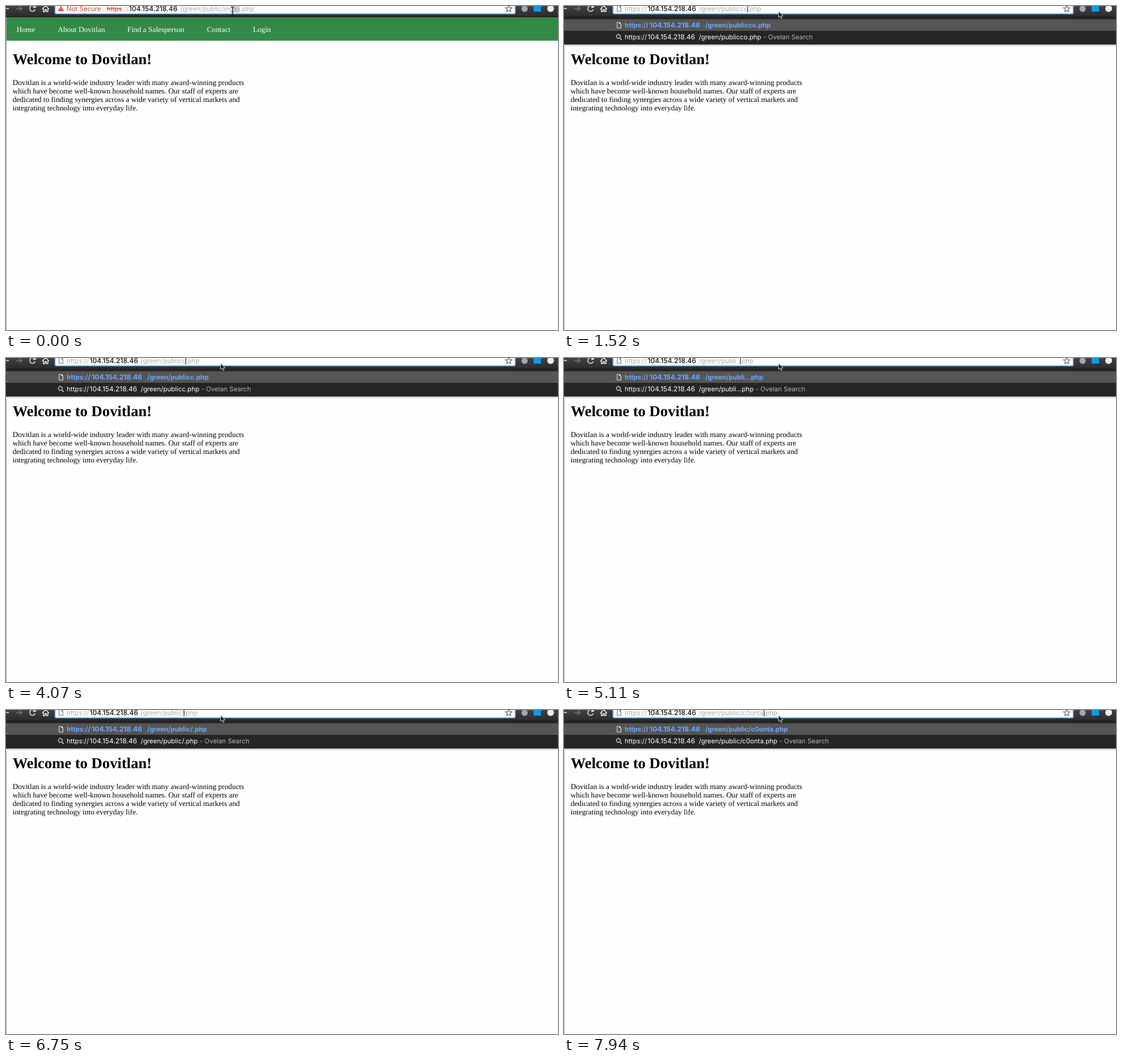
These frames come from a looping animation (975 by 574 pixels, 8 s). An HTML page:

```html
<!DOCTYPE html>
<html lang="en">
<head>
<meta charset="utf-8">
<title>Address bar</title>
<style>
  html, body { margin: 0; width: 100%; height: 100%; overflow: hidden; background: #fff; }
  svg { display: block; width: 975px; height: 574px; }
  text { text-rendering: geometricPrecision; white-space: pre; }
  .page { font: 13.33px "Liberation Serif", serif; }
  .page .title { font-size: 26.67px; font-weight: bold; }
  .ui { font: 11.5px Inter, sans-serif; }
  .host { font-size: 12.1px; }
  .bar .host { fill: #111; font-weight: 500; }
  .bar { fill: #acacac; }
  .line { fill: none; stroke-width: 1.2; }
</style>
</head>
<body>
<svg viewBox="0 0 975 574">
  <defs>
    <linearGradient id="tool" x2="0" y2="1">
      <stop offset="0" stop-color="#424242"/><stop offset="1" stop-color="#292929"/>
    </linearGradient>
    <linearGradient id="shade" x2="0" y2="1">
      <stop offset="0" stop-color="#c4c4c4"/><stop offset="1" stop-color="#f4f4f4"/>
    </linearGradient>
    <path id="doc" class="line" d="M-3 -5H1L3.5 -2.5V5H-3ZM1 -5V-2.5H3.5"/>
  </defs>

  <rect width="975" height="574" fill="#fefefe"/>
  <g class="page">
    <rect y="20" width="975" height="41.5" fill="#338a47"/>
    <g fill="#fff">
      <text x="18.8" y="46">Home</text>
      <text x="91.5" y="46">About Dovitlan</text>
      <text x="214.3" y="46">Find a Salesperson</text>
      <text x="354.9" y="46">Contact</text>
      <text x="436.2" y="46">Login</text>
    </g>
    <text class="title" x="11.7" y="103.3">Welcome to Dovitlan!</text>
    <text y="140">
      <tspan x="11.7">Dovitlan is a world-wide industry leader with many award-winning products</tspan>
      <tspan x="11.7" dy="15">which have become well-known household names. Our staff of experts are</tspan>
      <tspan x="11.7" dy="15">dedicated to finding synergies across a wide variety of vertical markets and</tspan>
      <tspan x="11.7" dy="15">integrating technology into everyday life.</tspan>
    </text>
  </g>
  <path d="M.5 20V574" stroke="#adadad"/>

  <!-- browser toolbar -->
  <rect width="975" height="20" fill="url(#tool)"/>
  <path d="M0 19.5H975" stroke="#1d1d1d"/>
  <path d="M86 -6H899.5V12Q899.5 14 897.5 14H88.5Q86.5 14 86.5 12V-6" fill="#fff" stroke="#5b9ce8" stroke-width="1.6"/>
  <g class="line" stroke="#e6e6e6" style="stroke-width:1.6">
    <path d="M0 4.5H5"/>
    <path d="M18 4.5H28M23.5 0L28 4.5L23.5 9" stroke="#777"/>
    <path d="M51.3 2A5 5 0 1 0 51.6 6.2M52 -2V2.5H47.5"/>
    <path d="M64 5.5L70 -.5L76 5.5M66 4.5V10H68.7V6.5H71.3V10H74V4.5"/>
  </g>
  <path class="line" d="M888 -1L889.6 2.9L893.8 3.2L890.6 5.9L891.6 10L888 7.8L884.4 10L885.4 5.9L882.2 3.2L886.4 2.9Z" stroke="#666"/>
  <circle cx="916" cy="5" r="5.5" fill="#a3a5b0"/>
  <rect x="932" y="-2" width="13" height="12" fill="#0c9be8"/>
  <circle cx="962" cy="4.5" r="6" fill="#f0f0f0"/>

  <!-- address before editing -->
  <g id="idle" class="ui">
    <rect id="selection" y="0" height="12" fill="#d2d2d2"/>
    <path d="M97 -.5L102 9H92Z" fill="#c5402f"/>
    <path d="M97 2.8V5.8M97 6.8V8" stroke="#fff" stroke-width="1.2"/>
    <text x="107" y="9" fill="#c5402f">Not Secure</text>
    <path d="M171.5 0V11" stroke="#ddd"/>
    <text class="bar" y="9"><tspan x="177.5" fill="#c5402f">https</tspan><tspan x="205">://</tspan><tspan class="host" x="217.3">104.154.218.46</tspan><tspan x="308">/green/public/index.php</tspan></text>
    <path d="M177.5 5H205" stroke="#c5402f"/>
  </g>

  <!-- address and suggestions while editing -->
  <g id="edit" class="ui">
    <rect y="20" width="975" height="48.5" fill="#252525"/>
    <rect y="23.5" width="975" height="20.5" fill="#555"/>
    <rect y="68.5" width="975" height="3" fill="url(#shade)"/>
    <use href="#doc" x="97" y="4.5" stroke="#777"/>
    <use href="#doc" x="97" y="34" stroke="#ddd"/>
    <path class="line" d="M99 57L102 60" stroke="#ddd" style="stroke-width:1.6"/>
    <circle class="line" cx="96" cy="54" r="3.6" stroke="#ddd"/>
    <text class="bar" y="9"><tspan x="107.3">https://</tspan><tspan class="host" x="147.8">104.154.218.46</tspan><tspan x="238" id="typed"></tspan><tspan>.php</tspan></text>
    <text y="38" fill="#71a4fb" font-weight="700"><tspan x="107.3">https://</tspan><tspan class="host" x="151.3">104.154.218.46</tspan><tspan x="249.5" class="path"></tspan></text>
    <text y="59" fill="#fff"><tspan x="107.3">https://</tspan><tspan class="host" x="147.8">104.154.218.46</tspan><tspan x="238" class="path"></tspan><tspan dx="3.5" fill="#b5b5b5">- Ovelan Search</tspan></text>
    <path id="caret" d="M0 0V11.5" stroke="#111"/>
  </g>

  <path id="beam" class="line" d="M-3 -7.5Q0 -7.5 0 -5.5Q0 -7.5 3 -7.5M0 -5.5V5.5M-3 7.5Q0 7.5 0 5.5Q0 7.5 3 7.5M-1.8 1.5H1.8" stroke="#111"/>
  <path id="arrow" d="M0 0V11L2.6 8.8L4.3 12.7L6.2 11.9L4.5 8.1H7.9Z" transform="translate(379 9.3)" fill="#111" stroke="#fff" stroke-width=".8"/>
</svg>
<script>
  const $ = id => document.getElementById(id);
  const LOOP = 8000, EDIT = 1520, BLINK = 600;

  // [time, pointer x, selection start]
  const drag = [[0, 400, 400], [300, 396, 393], [450, 390, 387], [600, 384, 383], [770, 379, 379]];

  // [time, text before the caret]
  const typing = [
    [1520, 'publicco'], [1670, 'publiccon'],
    [3920, 'publicco'], [4070, 'publicc'], [4220, 'public'],
    [4810, 'publi'], [4960, 'publi.'], [5110, 'publi..'],
    [5560, 'publi'], [5710, 'public'], [5850, 'public/'],
    [6450, 'public'], [6750, 'public/'], [6900, 'public/c'], [7050, 'public/c0'],
    [7500, 'public/c0on'], [7640, 'public/c0ont'], [7940, 'public/c0onta']
  ];

  const latest = (steps, t) => steps.findLast(s => s[0] <= t);
  const show = (id, on) => $(id).setAttribute('visibility', on ? 'visible' : 'hidden');

  function draw(t) {
    const [, pointer, start] = latest(drag, t);
    const editing = t >= EDIT;
    const beam = t < 1370 || (t >= 1820 && t < 3920);
    show('idle', !editing);
    show('edit', editing);
    show('beam', beam);
    show('arrow', !beam);
    $('beam').setAttribute('transform', `translate(${pointer} 9)`);
    $('selection').setAttribute('x', start);
    $('selection').setAttribute('width', 412.5 - start);

    if (editing) {
      const [since, word] = latest(typing, t);
      const path = '/green/' + word;
      $('typed').textContent = path;
      document.querySelectorAll('.path').forEach(e => e.textContent = path + '.php');
      const x = 238.5 + $('typed').getComputedTextLength();
      $('caret').setAttribute('transform', `translate(${Math.floor(x) + .5} 0)`);
      show('caret', Math.floor((t - since) / BLINK) % 2 === 0);
    } else {
      show('caret', false);
    }
  }

  const begin = performance.now();
  function frame() {
    draw((performance.now() - begin) % LOOP);
    requestAnimationFrame(frame);
  }
  frame();
</script>
</body>
</html>
```
